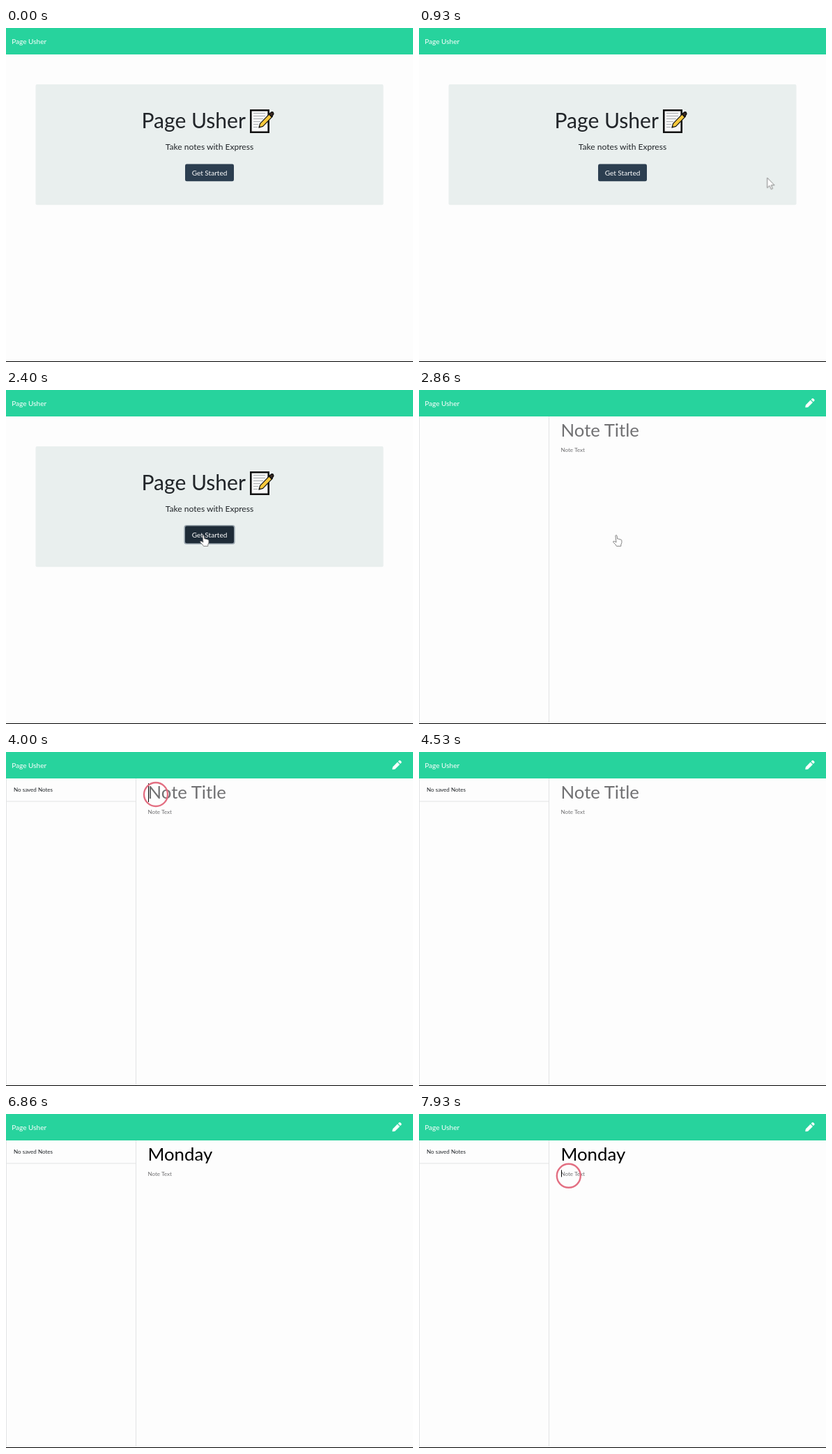
An HTML page for the animation above (8000 ms loop, 584 by 480 pixels).

```html
<!DOCTYPE html>
<html lang="en">
<head>
<meta charset="utf-8">
<title>Notes app demo</title>
<style>
  html, body { margin: 0; width: 100%; height: 100%; overflow: hidden; background: #fdfdfd; }
  svg { display: block; width: 584px; height: 480px; }
  text { font-family: Lato, sans-serif; font-size: 8.05px; fill: #212529; white-space: pre; }
  .mid { text-anchor: middle; }
  .brand, .label { font-size: 10.06px; fill: #fff; }
  .headline { font-size: 30.05px; }
  .lead { font-size: 12.07px; }
  .big { font-size: 25.76px; }
  .hint { fill: #717173; }
  .typed { fill: #000; }
  .line { stroke: #e2e3e4; }

  .home, .notes, .list, .cursor, .arrow, .hand, .focus, .click { animation: 8s step-end infinite; }
  .notes, .list, .focus, .hand, .cursor, .click { opacity: 0; }

  .home { animation-name: home; }
  @keyframes home { 0% { opacity: 1 } 35.75%, 100% { opacity: 0 } }
  .notes { animation-name: notes; }
  @keyframes notes { 0% { opacity: 0 } 35.75%, 100% { opacity: 1 } }
  .list { animation-name: list; }
  @keyframes list { 0% { opacity: 0 } 36.625%, 100% { opacity: 1 } }

  .button { animation: hover 8s linear infinite; }
  @keyframes hover { 0%, 14.5% { fill: #2c3e50 } 16.4%, 100% { fill: #1e2b37 } }
  .focus { animation-name: focus; }
  @keyframes focus { 0% { opacity: 0 } 26.625%, 100% { opacity: 1 } }

  .cursor { animation-name: cursor; }
  @keyframes cursor { 0% { opacity: 0 } 9.125% { opacity: 1 } 40%, 100% { opacity: 0 } }
  .path { animation: path 8s linear infinite; }
  @keyframes path {
    0%, 9.1% { transform: translate(563px, 218px); animation-timing-function: cubic-bezier(.4, 0, .4, 1) }
    18.25% { transform: translate(266px, 205px) }
    19.1% { transform: translate(269px, 206px) }
    20.75%, 100% { transform: translate(283px, 208px) }
  }
  .arrow { animation-name: arrow; }
  @keyframes arrow { 0% { opacity: 1 } 14.5%, 100% { opacity: 0 } }
  .hand { animation-name: hand; }
  @keyframes hand { 0% { opacity: 0 } 14.5%, 100% { opacity: 1 } }

  .click { fill: none; stroke: #e2687c; stroke-width: 2.4; animation-timing-function: linear; }
  .click.start { animation-name: start; }
  @keyframes start { 0%, 26.6% { opacity: 0 } 26.63%, 28.6% { opacity: .95 } 30%, 100% { opacity: 0 } }
  .click.title { animation-name: title; }
  @keyframes title { 0%, 49.95% { opacity: 0 } 50%, 51.6% { opacity: .95 } 52.5%, 100% { opacity: 0 } }
  .click.body { animation-name: body; }
  @keyframes body { 0%, 98.2% { opacity: 0 } 98.25%, 100% { opacity: .95 } }
</style>
</head>
<body>
<svg viewBox="0 0 584 480">
  <rect width="584" height="480" fill="#fdfdfd"/>

  <g class="home">
    <rect x="42.5" y="81" width="499" height="173.3" rx="2" fill="#e9efee"/>
    <text class="headline" x="194.5" y="144.2">Page Usher</text>
    <g class="memo">
      <path d="M351.3 118.3H376.7V149.8H351.3Z" fill="#f7f7f7" stroke="#111" stroke-width="2.6"/>
      <path d="M355 122.5H372M355 126.5H372M355 130.5H369M355 134.5H365M355 138.5H362M355 142.5H361" stroke="#a9adb0" stroke-width="1.2"/>
      <path d="M363 143l1.6-5.6L378.4 123.2l4 4L368.6 141.4Z" fill="#f8c93c" stroke="#111" stroke-width="1.2" stroke-linejoin="round"/>
      <path d="M377.6 124l2.8-2.8q3-1.6 3.4 2.4l-2.6 4Z" fill="#3c2a22" stroke="#111" stroke-width="1.6" stroke-linejoin="round"/>
      <path d="M362.6 143.4l.9-2.8 1.9 1.9Z" fill="#111"/>
    </g>
    <text class="lead mid" x="292" y="175.3">Take notes with Express</text>
    <rect class="focus" x="255.4" y="193.9" width="73.2" height="27.9" rx="3.5" fill="#98a4ad"/>
    <rect class="button" x="257" y="195.5" width="70" height="24.8" rx="2.4"/>
    <text class="label mid" x="292" y="211.6">Get Started</text>
  </g>

  <g class="notes">
    <path class="line" d="M.5 38V479M186.5 38V479"/>
    <g class="list">
      <path class="line" d="M1 71H186"/>
      <text x="11" y="57.4">No saved Notes</text>
    </g>
    <text class="big hint" id="hint" x="203.5" y="67.4">Note Title</text>
    <text class="big typed" id="typed" x="203.5" y="67.4"></text>
    <text class="hint" x="203.5" y="88.6">Note Text</text>
    <rect id="caret" y="45" width="1" height="27"/>
    <rect id="caret2" x="204" y="80.5" width="1" height="10"/>
  </g>

  <rect width="584" height="38" fill="#27d39d"/>
  <text class="brand" x="8.2" y="22.6">Page Usher</text>
  <g class="notes">
    <path transform="translate(554.3 11.9)" fill="#fff"
      d="M7.4 2.7L10.7 6 3.9 12.8.7 13.4Q-.1 13.4 0 12.6L.6 9.5ZM8.3 1.8L9.7.4Q10.6-.4 11.5.4L13 1.9Q13.8 2.8 13 3.7L11.6 5.1Z"/>
  </g>

  <g class="cursor"><g class="path" fill="#fff" stroke="#777" stroke-width=".9" stroke-linejoin="round">
    <path class="arrow" d="M0 0V14.5L3.3 11.4 5.6 16.5 7.8 15.5 5.6 10.7H10.3Z"/>
    <path class="hand" d="M-1.1 1.3Q0-.3 1 1.3L1.7 6Q3 5.3 3.8 6.4 5.2 5.8 6 7 7.6 6.8 7.9 8.4 8.4 12 6.8 14V16.4H.4Q-.5 14-4.2 10.8-4.8 9-2.8 9.3L0 11Z"/>
  </g></g>

  <circle class="click start" cx="281" cy="210" r="17"/>
  <circle class="click title" cx="215" cy="61" r="17"/>
  <circle class="click body" cx="214.8" cy="88.8" r="17"/>
  <rect y="479" width="584" height="1" fill="#000"/>
</svg>
<script>
  const LOOP = 8000;
  const word = "Monday";
  const keys = [4930, 5200, 5600, 5800, 6060, 6330];
  const caretOn = [[4000, 4530], [4930, 6860], [7400, 7860]];
  const [hint, typed, caret, caret2] =
    ["hint", "typed", "caret", "caret2"].map(id => document.getElementById(id));
  const show = (el, on) => el.setAttribute("visibility", on ? "visible" : "hidden");
  let start;

  function draw(now) {
    start ??= now;
    const t = (now - start) % LOOP;
    const text = word.slice(0, keys.filter(k => t >= k).length);
    if (typed.textContent !== text) typed.textContent = text;
    show(hint, !text);
    const width = text ? typed.getComputedTextLength() : 0;
    caret.setAttribute("x", Math.round(203.5 + width));
    show(caret, caretOn.some(([a, b]) => t >= a && t < b));
    show(caret2, t >= 7860);
    requestAnimationFrame(draw);
  }
  requestAnimationFrame(draw);
</script>
</body>
</html>
```
